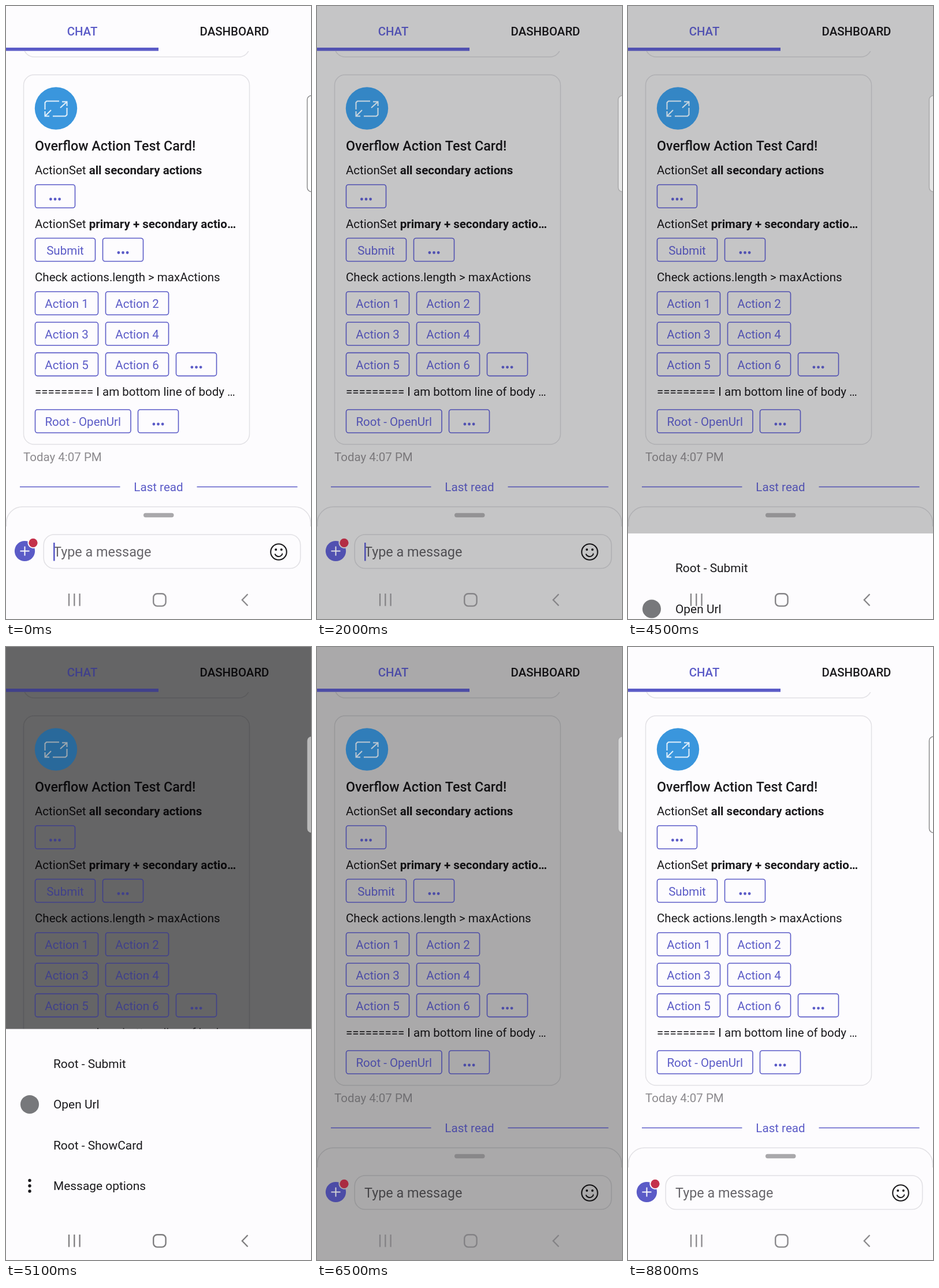
An HTML page with a canvas that plays this animation: 528x1060 px, repeating every 9000 ms.

```html
<!DOCTYPE html>
<html lang="en">
<head>
<meta charset="utf-8">
<title>Overflow actions</title>
<style>
html, body { margin: 0; width: 528px; height: 1060px; overflow: hidden; background: #fdfcfe; }
canvas { display: block; width: 528px; height: 1060px; }
</style>
</head>
<body>
<canvas id="stage"></canvas>
<script>
const W = 528, H = 1060, LOOP = 9000, STEP = 100;
const canvas = document.getElementById('stage');
const ctx = canvas.getContext('2d');
const ratio = window.devicePixelRatio || 1;
canvas.width = W * ratio;
canvas.height = H * ratio;

const BG = [253, 252, 254], INK = [27, 26, 29], PURPLE = [91, 91, 199];
const BORDER = [226, 225, 229], GREY = [140, 138, 142], WHITE = [255, 255, 255];
const NAV_TOP = 990, ROW = 70.4;

// Backdrop darkness: [ms, amount]
const DIM = [
  [0, 0], [700, 0], [800, .22], [900, .42], [1000, .55], [1100, .6],
  [1700, .6], [1800, .455], [1900, .3], [2000, .22], [2100, .36], [2200, .5], [2300, .6],
  [3200, .6], [3300, .455], [3900, 0],
  [4400, 0], [4500, .22], [4600, .42], [4700, .55], [4800, .6],
  [6000, .6], [6100, .455], [6400, .22], [6500, .33], [6600, .45], [6700, .55], [6800, .6],
  [7900, .6], [8000, .455], [8600, 0], [LOOP, 0]
];
const SHEETS = [
  { from: 750, open: 1100, close: 1800, skip: 2 },
  { from: 2050, open: 2500, close: 3300, skip: 0 },
  { from: 4450, open: 4800, close: 6100, skip: 0 },
  { from: 6550, open: 7000, close: 8000, skip: 0 }
];
const CLOSING = [[1800, 2000], [3300, 4000], [6100, 6400], [8000, 8700]];
const MENU = ['Root - Submit', 'Open Url', 'Root - ShowCard', 'Message options'];
const CURSOR_OFF = 4100;

let dim = 0;

function dimAt(t) {
  const i = DIM.findIndex(k => k[0] > t);
  const [t0, a] = DIM[i - 1], [t1, b] = DIM[i];
  return a + (b - a) * (t - t0) / (t1 - t0);
}

// weight: how strongly the backdrop darkens this colour
function shade(c, weight = 1) {
  const f = 1 - dim * weight;
  return `rgb(${c.map(v => Math.round(v * f)).join(',')})`;
}
const accent = () => shade(PURPLE, .5);

function text(str, x, y, size, color, weight = 400, align = 'left') {
  ctx.font = `${weight} ${size}px Roboto, sans-serif`;
  ctx.textAlign = align;
  ctx.fillStyle = color;
  ctx.fillText(str, x, y + size * .355);
  return ctx.measureText(str).width;
}

function box(x, y, w, h, r, stroke, width = 1.5, fill) {
  ctx.beginPath();
  ctx.roundRect(x, y, w, h, r);
  if (fill) { ctx.fillStyle = fill; ctx.fill(); }
  if (stroke) { ctx.strokeStyle = stroke; ctx.lineWidth = width; ctx.stroke(); }
}

function disc(x, y, r, fill) {
  ctx.beginPath();
  ctx.arc(x, y, r, 0, Math.PI * 2);
  ctx.fillStyle = fill;
  ctx.fill();
}

function line(points, color, width) {
  ctx.beginPath();
  points.forEach(([x, y], i) => i ? ctx.lineTo(x, y) : ctx.moveTo(x, y));
  ctx.strokeStyle = color;
  ctx.lineWidth = width;
  ctx.stroke();
}

function button(x, y, w, label) {
  box(x + .5, y, w - 1, 40, 4, accent(), 1.6);
  const mid = x + w / 2;
  if (label) text(label, mid, y + 21, 20.5, accent(), 400, 'center');
  else for (const d of [-7.6, 0, 7.6]) disc(mid + d, y + 25, 2.4, accent());
}

function mixedLine(y, plain, bold) {
  const w = text(plain, 50, y, 20.5, shade(INK));
  text(bold, 50 + w, y, 20.5, shade(INK), 700);
}

function expandIcon() {
  disc(86.5, 177, 36.7, shade([58, 150, 221], .5));
  const c = shade([226, 240, 251], .5);
  line([[92, 164.5], [70, 164.5], [67.5, 167], [67.5, 179]], c, 2);
  line([[81, 190.5], [103, 190.5], [105.5, 188], [105.5, 176]], c, 2);
  line([[94, 176], [105, 166]], c, 2);
  line([[97, 165.5], [105.5, 165.5], [105.5, 173]], c, 2);
  line([[78, 180], [68, 190]], c, 2);
  line([[67.5, 182], [67.5, 190.5], [75, 190.5]], c, 2);
}

function card() {
  const ink = shade(INK), edge = shade(BORDER);
  ctx.save();
  ctx.beginPath();
  ctx.rect(0, 78, W, 20);
  ctx.clip();
  box(30.5, 20, 391, 68, 18, edge);
  ctx.restore();

  box(30.5, 119, 391, 639, 18, edge);
  expandIcon();
  text('Overflow Action Test Card!', 50, 242, 23.3, ink, 500);
  mixedLine(284, 'ActionSet ', 'all secondary actions');
  button(50, 309, 70);
  mixedLine(376.5, 'ActionSet ', 'primary + secondary actio…');
  button(50, 401.5, 105, 'Submit');
  button(167, 401.5, 71);
  text('Check actions.length > maxActions', 50, 468.5, 20.5, ink);
  for (let i = 0; i < 6; i++) {
    button(50 + i % 2 * 122, 494 + (i >> 1) * 52.8, 110, 'Action ' + (i + 1));
  }
  button(294, 599.6, 71);
  text('========= I am bottom line of body …', 50, 667, 20.5, ink);
  button(50, 698, 166.5, 'Root - OpenUrl');
  button(228, 698, 71);
}

function tabs() {
  text('CHAT', 132, 43.5, 20.4, accent(), 500, 'center');
  text('DASHBOARD', 395.5, 43.5, 20.4, shade(INK), 500, 'center');
  ctx.fillStyle = accent();
  ctx.fillRect(0, 72, 264, 5.6);
}

function composer(cursor) {
  const bg = shade(BG), edge = shade(BORDER), ink = shade(INK);
  text('Today 4:07 PM', 30, 779.5, 20.5, shade(GREY, .6));
  line([[24, 831.5], [197.5, 831.5]], accent(), 1.3);
  line([[330.5, 831.5], [504.5, 831.5]], accent(), 1.3);
  text('Last read', 264, 832, 20.6, accent(), 400, 'center');

  ctx.save();
  ctx.beginPath();
  ctx.rect(0, 860, W, 40);
  ctx.clip();
  box(.5, 866, W - 1, 140, 28, edge, 1.6);
  ctx.restore();
  box(238, 876.8, 52.5, 7.4, 3.7, null, 0, shade([169, 168, 171], .6));

  disc(32.5, 942.5, 17.6, accent());
  line([[24.5, 942.5], [40.5, 942.5]], shade(WHITE, .5), 1.9);
  line([[32.5, 934.5], [32.5, 950.5]], shade(WHITE, .5), 1.9);
  disc(47, 928.3, 9.6, bg);
  disc(47, 928.3, 7.6, shade([196, 49, 75], .4));

  box(65.2, 914, 444.5, 58.5, 18, edge, 1.6);
  text('Type a message', 82, 944, 23.4, shade([103, 101, 106]));
  if (cursor) {
    ctx.fillStyle = accent();
    ctx.fillRect(82, 928, 2.6, 31.5);
  }

  ctx.beginPath();
  ctx.arc(472, 944, 13.8, 0, Math.PI * 2);
  ctx.moveTo(478.6, 947.5);
  ctx.arc(472, 945, 7, .36, Math.PI - .36);
  ctx.strokeStyle = ink;
  ctx.lineWidth = 2.1;
  ctx.stroke();
  disc(467.2, 940, 2, ink);
  disc(476.8, 940, 2, ink);
}

function edgePanel() {
  const a = Math.max(0, 1 - dim * 2);
  box(521.5, 155, 20, 166, 7, `rgba(138,138,140,${a})`, 1.5, shade(WHITE, .45));
}

function sheet(t) {
  const s = SHEETS.find(o => t > o.from && t < o.close);
  if (!s) return;
  const p = Math.min(1, (t - s.from) / (s.open - s.from));
  const height = 399.5 - s.skip * ROW;
  const top = H - height * (1 - (1 - p) ** 3);
  ctx.fillStyle = 'rgb(253,252,254)';
  ctx.fillRect(0, top, W, H - top);
  MENU.slice(s.skip).forEach((label, i) => {
    const y = top + 60 + i * ROW;
    text(label, 82, y, 20.9, 'rgb(27,26,29)');
    if (label === 'Open Url') disc(41, y, 16, '#77787b');
    if (label === 'Message options') {
      for (const d of [-9.3, 0, 9.3]) disc(41, y + d, 2.7, 'rgb(27,26,29)');
    }
  });
}

function navIcons() {
  const c = shade([138, 137, 140], .15);
  for (const x of [109, 118.3, 127.6]) line([[x, 1016], [x, 1037.5]], c, 2.3);
  box(255.2, 1016.2, 21.4, 21.4, 6.5, c, 2.4);
  line([[418.5, 1017], [408.8, 1027], [418.5, 1037]], c, 2.3);
}

function draw(t) {
  dim = dimAt(t);
  ctx.setTransform(ratio, 0, 0, ratio, 0, 0);
  ctx.textBaseline = 'alphabetic';
  ctx.fillStyle = shade(BG);
  ctx.fillRect(0, 0, W, H);
  tabs();
  card();
  composer(t < CURSOR_OFF);
  if (CLOSING.some(([a, b]) => t >= a && t < b)) {
    ctx.fillStyle = shade(BG, .1);
    ctx.fillRect(0, NAV_TOP, W, H - NAV_TOP);
  }
  edgePanel();
  sheet(t);
  navIcons();
}

const start = performance.now();
function tick() {
  const t = (performance.now() - start) % LOOP;
  draw(Math.floor(t / STEP) * STEP);
  requestAnimationFrame(tick);
}
tick();
</script>
</body>
</html>
```
